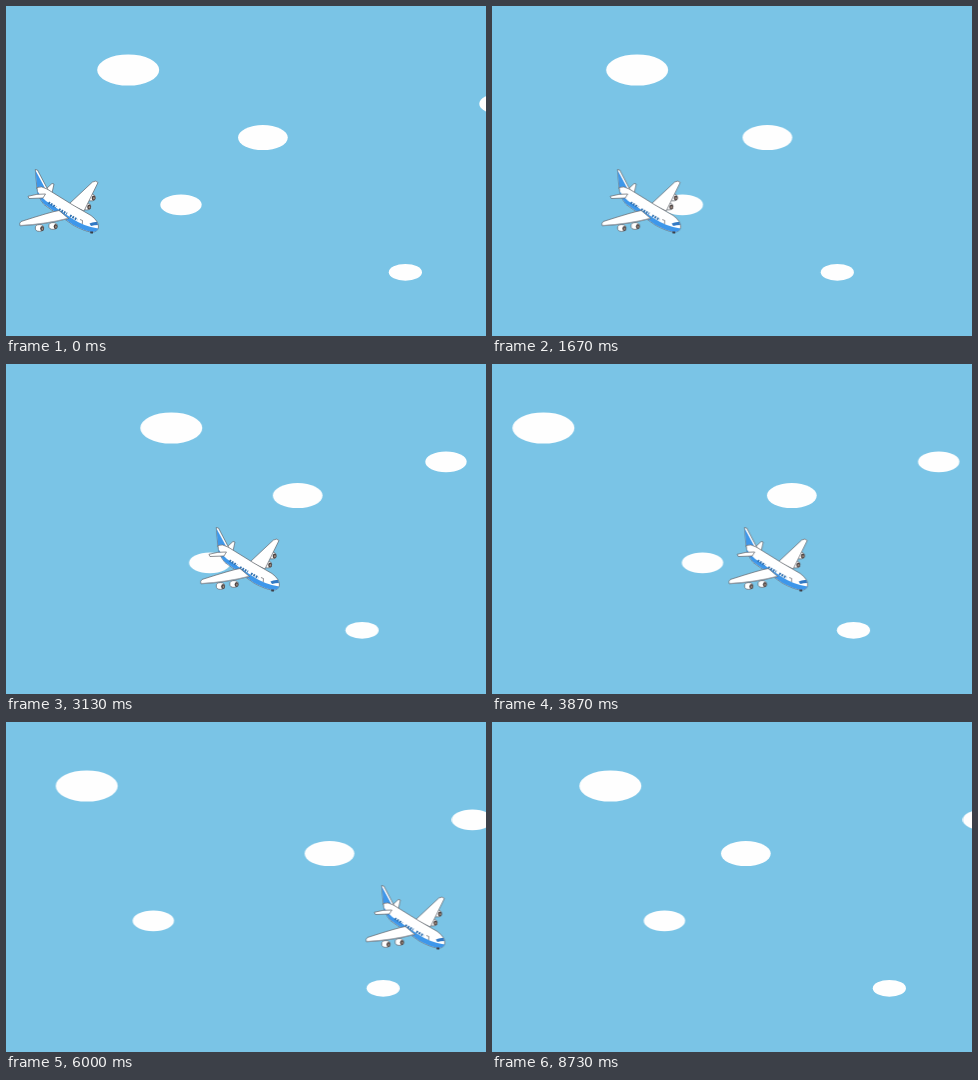
Recreate the animation shown at these times as an HTML page without scripts. Size 480 px wide and 330 px high, loop 8790 ms.

```html
<!DOCTYPE html>
<html lang="en">
<head>
<meta charset="utf-8">
<title>Plane among clouds</title>
<style>
  html, body { margin: 0; width: 100%; height: 100%; overflow: hidden; background: #7ac4e6; }
  svg { display: block; width: 480px; height: 330px; }

  /* 132 even steps per loop */
  .drift, .plane { animation: 8.79s steps(132) infinite; }
  .drift { animation-name: drift; }
  .plane { animation-name: fly; }
  .drift ellipse { fill: #fefefe; animation: 8.79s step-end infinite; }

  /* a cloud crosses twice its width in 9s, then hops back */
  @keyframes drift { to { transform: translateX(calc(var(--w) * 1.953)); } }
  @keyframes fly { to { transform: translateX(508px); } }
  @keyframes hop-a { 0% { transform: none; } 38.6%, 100% { transform: translateX(calc(var(--w) * -2)); } }
  @keyframes hop-b { 0% { transform: none; } 86.3%, 100% { transform: translateX(calc(var(--w) * -2)); } }
  @keyframes hop-c { 0% { transform: none; } 61.3%, 100% { transform: translateX(calc(var(--w) * -2)); } }
  @keyframes hop-d { 0% { transform: none; } 3.8%, 100% { transform: translateX(calc(var(--w) * -2)); } }
  @keyframes hop-e { 0% { transform: none; } 25%, 100% { transform: translateX(calc(var(--w) * -2)); } }

  .line { stroke: #5c6068; stroke-width: .7; stroke-linejoin: round; }
  .white { fill: #fff; }
  .blue { fill: #3e97ea; }
  .windows { fill: none; stroke: #2f6fae; stroke-width: 2.4; }
</style>
</head>
<body>
<svg viewBox="0 0 480 330">
  <defs>
    <g id="engine">
      <ellipse class="white line" cx="-1" rx="4.2" ry="3.4"/>
      <ellipse cx="1.6" cy=".5" rx="1.9" ry="2.5" fill="#4a4242"/>
      <ellipse cx="1.9" cy=".7" rx=".8" ry="1.2" fill="#a08c80"/>
    </g>
  </defs>

  <g class="drift" style="--w:62px"><ellipse style="animation-name:hop-a" cx="122.2" cy="64" rx="31" ry="15.6"/></g>
  <g class="drift" style="--w:50px"><ellipse style="animation-name:hop-b" cx="256.9" cy="131.6" rx="24.9" ry="12.5"/></g>
  <g class="drift" style="--w:41.4px"><ellipse style="animation-name:hop-c" cx="175" cy="198.8" rx="20.7" ry="10.4"/></g>
  <g class="drift" style="--w:33.2px"><ellipse style="animation-name:hop-d" cx="399.4" cy="266.3" rx="16.6" ry="8.4"/></g>
  <g class="drift" style="--w:41.4px"><ellipse style="animation-name:hop-e" cx="494" cy="97.8" rx="20.7" ry="10.4"/></g>

  <g class="plane">
    <!-- far tailplane, far wing and its engines -->
    <path class="white line" d="M39 184 46 177.5 48 178 46 187Z"/>
    <use href="#engine" x="86" y="191.5"/>
    <use href="#engine" x="81.5" y="200.5"/>
    <path class="white line" d="M63 198 86.500 176 Q90 174 92 176.500 L78 205Z"/>

    <!-- fin -->
    <path class="white line" d="M29.300 163.500 31.500 164 42 184 31 183Z"/>
    <path class="blue" d="M29.500 164.500 39.500 183 31.200 182.500Z"/>

    <!-- fuselage -->
    <path class="white line" d="M31 181.500 Q35 179.500 41 183 L66 198.500 85 209.500 Q92.500 215 92.500 221 Q92 226 85.500 226.200 Q78 225 67 219 L38 198.500 Q31 190 31 181.500Z"/>
    <path class="blue" d="M31.300 185 Q34 190 40 195 L66 212.500 Q78 220.500 92.200 222.500 Q91 226 85.500 225.900 Q78 224.700 67 218.700 L38 198 Q32 191 31.300 185Z"/>
    <path class="windows" stroke-dasharray="1.700 1.100" d="M42.500 196.500 50 201.200M53 203.200 61 207.800M64 209.500 71.500 213.800"/>
    <path class="line" fill="none" d="M74 213.500 76.500 214.500 76.300 218"/>
    <path d="M83.500 217.500 Q87 215.500 91 216 L92 219 Q88 219 85 220Z" fill="#3279c4"/>
    <path d="M84 225.500h3v2h-2.500z" fill="#3a3d46"/>

    <!-- near tailplane, engines and near wing -->
    <path class="white line" d="M39.500 188 Q31 187.500 22 190.300 L23 192.500 37 192Z"/>
    <use href="#engine" x="34.500" y="222"/>
    <use href="#engine" x="48" y="220"/>
    <path class="white line" d="M53 204.500 Q46 205.500 15 215.500 Q13 217 14 219.800 Q40 218.500 62.500 212.500Z"/>
    <path d="M14.200 219.500 Q40 218 62 212.300" fill="none" stroke="#9aa3ad" stroke-width=".8"/>
  </g>
</svg>
</body>
</html>
```
